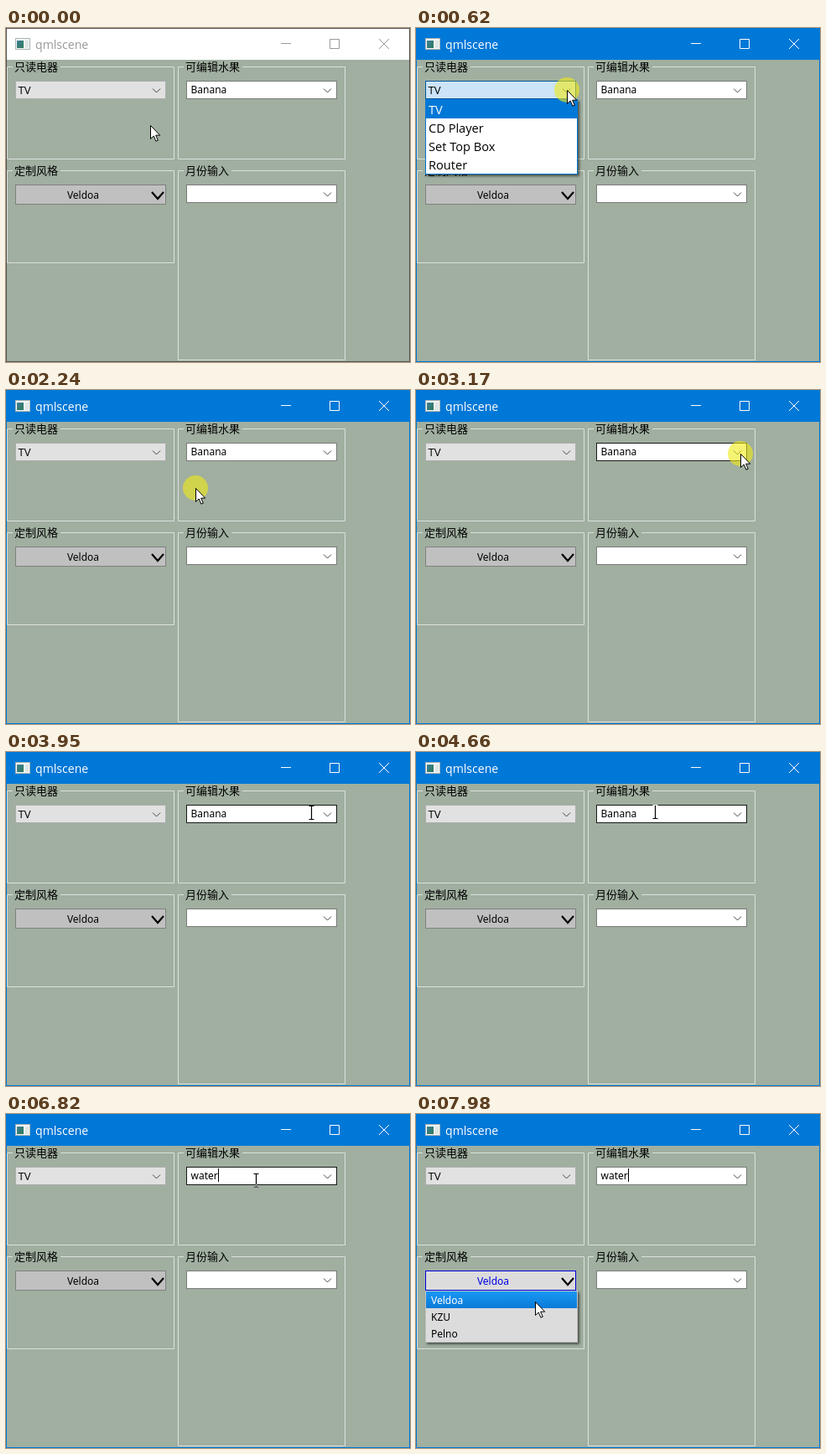
An HTML page that plays this animation: 482 by 399 pixels, repeating every 8 s.

```html
<!DOCTYPE html>
<html lang="zh-CN">
<head>
<meta charset="utf-8">
<title>qmlscene</title>
<style>
  html, body { margin: 0; width: 100%; height: 100%; overflow: hidden; background: #a0afa0; }
  svg { display: block; position: absolute; left: 0; top: 0; isolation: isolate; }
  text { white-space: pre; }
  .ui { font-family: "Open Sans", "Noto Sans", sans-serif; }
  .small { font: 12px "Noto Sans", "Open Sans", sans-serif; }
  .label { font: 13px "Noto Sans CJK SC", "Noto Sans CJK", sans-serif; }
  .crisp { shape-rendering: crispEdges; }
  .shadow { filter: drop-shadow(2px 2px 1.5px rgba(0, 0, 0, .55)); }
  #beam { mix-blend-mode: difference; }
</style>
</head>
<body>
<svg width="482" height="399" viewBox="0 0 482 399">
  <defs>
    <linearGradient id="blue" x2="0" y2="1">
      <stop stop-color="#1a98f4"/><stop offset="1" stop-color="#0a7ad8"/>
    </linearGradient>
    <linearGradient id="teal" x2="1" y2="1">
      <stop stop-color="#3c7f96"/><stop offset="1" stop-color="#2f7a5c"/>
    </linearGradient>
    <clipPath id="selClip"><rect id="selArea" y="65" height="16"/></clipPath>
    <path id="chevron" d="M-4.5-2.500l4.500 4.500 4.500-4.500" fill="none" stroke="#444"/>
  </defs>

  <rect width="482" height="399" fill="#a0afa0"/>
  <rect id="bar" width="482" height="38"/>
  <rect id="frame" x=".5" y=".5" width="481" height="398" fill="none"/>
  <g class="crisp">
    <rect x="11.5" y="12.5" width="17" height="13" fill="#f4f6f6" stroke="#a9b4b6"/>
    <rect x="13" y="15" width="8" height="9" fill="url(#teal)"/>
    <rect x="23" y="15" width="4" height="9" fill="#dfe6e6"/>
  </g>
  <text id="title" class="ui" x="35" y="25" font-size="14.1">qmlscene</text>
  <g id="buttons" fill="none">
    <path d="M328 18.5h12M386.5 13.5h11v11h-11zM445 13l12 12M457 13l-12 12"/>
  </g>

  <g id="groups"></g>

  <rect id="box1" x="11.5" y="63.5" width="179" height="21"/>
  <text class="ui" x="14.5" y="79" font-size="13.2">TV</text>
  <use href="#chevron" x="179.5" y="75"/>

  <rect id="box2" x="215.5" y="63.5" width="179" height="21" fill="#fff"/>
  <text id="entry" class="small" x="220.5" y="78"></text>
  <g clip-path="url(#selClip)">
    <rect x="221" y="65" width="42" height="16" fill="#0078d7"/>
    <text class="small" x="220.5" y="78" fill="#fff">Banana</text>
  </g>
  <rect id="caret" class="crisp" y="65" width="1" height="16"/>
  <use href="#chevron" x="383.5" y="75"/>

  <rect id="box3" x="11.5" y="187.5" width="179" height="23"/>
  <text id="choice" class="small" x="92" y="204" text-anchor="middle">Veldoa</text>
  <path d="M174 196l7 8 7-8" fill="none" stroke="#000" stroke-width="2.2"/>

  <rect x="215.5" y="187.5" width="179" height="21" fill="#fff" stroke="#7a7a7a"/>
  <use href="#chevron" x="383.5" y="199"/>

  <g id="popups"></g>

  <circle id="halo" r="15" fill="#f0eb14" opacity=".6"/>
  <path id="arrow" d="M.5.5v16l3.700-3.500 2.700 6.200 2.400-1-2.700-6h5.100z" fill="#fff" stroke="#000"/>
  <path id="beam" d="M-3-8h2.500l.5 1 .5-1h2.500M0-7.500v15M-3 8h2.500l.5-1 .5 1h2.500" fill="none" stroke="#fff" stroke-width="1.2"/>
</svg>
<script>
const LOOP = 8000, SAMPLE = 77, FLASH = 160;
const TEXT_LEFT = 221, TEXT_RIGHT = 263;

const $ = id => document.getElementById(id);
const set = (el, attrs) => { for (const k in attrs) el.setAttribute(k, attrs[k]); };
const show = (el, on) => set(el, { visibility: on ? "visible" : "hidden" });
const clamp = (v, lo, hi) => Math.max(lo, Math.min(hi, v));
const between = (t, a, b) => t >= a && t < b;

function add(parent, tag, attrs, text) {
  const el = document.createElementNS("http://www.w3.org/2000/svg", tag);
  set(el, attrs);
  if (text) el.textContent = text;
  return parent.appendChild(el);
}

function addGroup(x, y, height, name) {
  const gap = name.length * 13 + 4;
  add($("groups"), "path", {
    d: `M${x + 7} ${y + .5}H${x + .5}v${height}h199v${-height}H${x + 8 + gap}`,
    fill: "none", stroke: "#dce1dc"
  });
  add($("groups"), "text", { class: "label", x: x + 9, y: y + 5 }, name);
}
addGroup(1, 46, 110, "只读电器");
addGroup(205, 46, 110, "可编辑水果");
addGroup(1, 170, 110, "定制风格");
addGroup(205, 170, 226, "月份输入");

// Returns update(open, pointerY); the row under the pointer lights up
function makePopup({ x, y, row, items, fill, border, hot, font, size, pad }) {
  const g = add($("popups"), "g", {});
  add(g, "rect", {
    x: x - .5, y: y - .5, width: 181, height: row * items.length + 1,
    fill, stroke: border, class: "shadow"
  });
  const bar = add(g, "rect", { x, width: 180, height: row, fill: hot, class: "crisp" });
  const texts = items.map((s, i) => add(g, "text", {
    class: font, style: `font-size:${size}px`,
    x: x + pad, y: y + row * i + Math.round(row / 2 + size * .4)
  }, s));
  return (open, pointerY) => {
    const active = clamp(Math.floor((pointerY - y) / row), 0, items.length - 1);
    show(g, open);
    set(bar, { y: y + row * active });
    texts.forEach((el, i) => set(el, { fill: i === active ? "#fff" : "#000" }));
  };
}

const plain = { y: 86, row: 22, fill: "#fff", border: "#0078d7", hot: "#0078d7", font: "ui", size: 14.6, pad: 3 };
const devices = makePopup({ ...plain, x: 12, items: ["TV", "CD Player", "Set Top Box", "Router"] });
const fruits = makePopup({ ...plain, x: 216, items: ["Banana"] });
const firms = makePopup({
  x: 12, y: 212, row: 20, items: ["Veldoa", "KZU", "Pelno"],
  fill: "#dcdcdc", border: "#c4c4c4", hot: "url(#blue)", font: "small", size: 12, pad: 6
});

const click = {
  devices: 540, dismiss: 2090, fruits: 3080, close: 3650,
  deselect: 5190, selectAll: 5500, firms: 7440
};
const drag = { from: 4720, to: 5030 };
const typing = { word: "water", from: 5810, every: 190 };

// Pointer moves: start, end, destination
const home = [172, 116];
const moves = [
  [70, 460, 180, 74],
  [850, 1310, 156, 131],
  [1640, 1940, 226, 117],
  [2320, 2930, 387, 76],
  [3790, 4110, 340, 68],
  [4420, drag.from, 275, 72],
  [drag.from, 4960, 182, 57],
  [drag.to, click.deselect, 305, 72],
  [6740, 7290, 170, 201],
  [7820, 7980, 142, 224]
];

function pointerAt(t) {
  let [x, y] = home;
  for (const [from, to, tx, ty] of moves) {
    const n = Math.round((to - from) / SAMPLE);
    const p = Math.floor(clamp((t - from) / (to - from), 0, 1) * n) / n;
    const e = p * p * (3 - 2 * p);
    x += (tx - x) * e;
    y += (ty - y) * e;
  }
  return [Math.round(x), Math.round(y)];
}

function selectionStart(t, x) {
  if (between(t, drag.from, drag.to)) return clamp(x, TEXT_LEFT, TEXT_RIGHT);
  const all = between(t, drag.to, click.deselect + FLASH) ||
    between(t, click.selectAll + 80, typing.from);
  return all ? TEXT_LEFT : TEXT_RIGHT;
}

function entryText(t) {
  if (t < typing.from) return "Banana";
  return typing.word.slice(0, 1 + Math.floor((t - typing.from) / typing.every));
}

function drawWindow(active) {
  set($("bar"), { fill: active ? "#0078d7" : "#fff" });
  set($("frame"), { stroke: active ? "#0078d7" : "#555" });
  set($("title"), { fill: active ? "#fff" : "#999" });
  set($("buttons"), { stroke: active ? "#fff" : "#999" });
}

function drawEntry(t, x) {
  const entry = $("entry"), sel = selectionStart(t, x);
  entry.textContent = entryText(t);
  set($("box2"), { stroke: between(t, 2860, 7290) ? "#171717" : "#7a7a7a" });
  set($("selArea"), { x: sel, width: TEXT_RIGHT - sel });
  set($("caret"), { x: Math.round(TEXT_LEFT + entry.getComputedTextLength()) });
  show($("caret"), t >= drag.from && sel === TEXT_RIGHT);
}

function drawPointer(t, x, y) {
  const dragging = between(t, drag.from, drag.to);
  const editing = dragging || (between(x, 217, 374) && between(y, 64, 85));
  const pressed = dragging || Object.values(click).some(c => between(t, c, c + FLASH));
  set($("arrow"), { transform: `translate(${x} ${y})` });
  set($("beam"), { transform: `translate(${x + .5} ${y + .5})` });
  set($("halo"), { cx: x, cy: y });
  show($("arrow"), !editing);
  show($("beam"), editing);
  show($("halo"), pressed);
}

function render(t) {
  const [x, y] = pointerAt(t);
  const open1 = between(t, click.devices + 80, click.dismiss + 80);
  const open2 = between(t, click.fruits + FLASH, click.close + 80);
  const open3 = t >= click.firms + FLASH;

  drawWindow(t >= click.devices);
  set($("box1"), { fill: open1 ? "#cce4f7" : "#e1e1e1", stroke: open1 ? "#005499" : "#adadad" });
  drawEntry(t, x);
  set($("box3"), { fill: open3 ? "#dcdcdc" : "#c0c0c0", stroke: open3 ? "#0000e0" : "#808080" });
  set($("choice"), { fill: open3 ? "#0000e6" : "#000" });
  devices(open1, y);
  fruits(open2, y);
  firms(open3, y);
  drawPointer(t, x, y);
}

const start = performance.now();
function tick() {
  render((performance.now() - start) % LOOP);
  requestAnimationFrame(tick);
}
tick();
</script>
</body>
</html>
```
